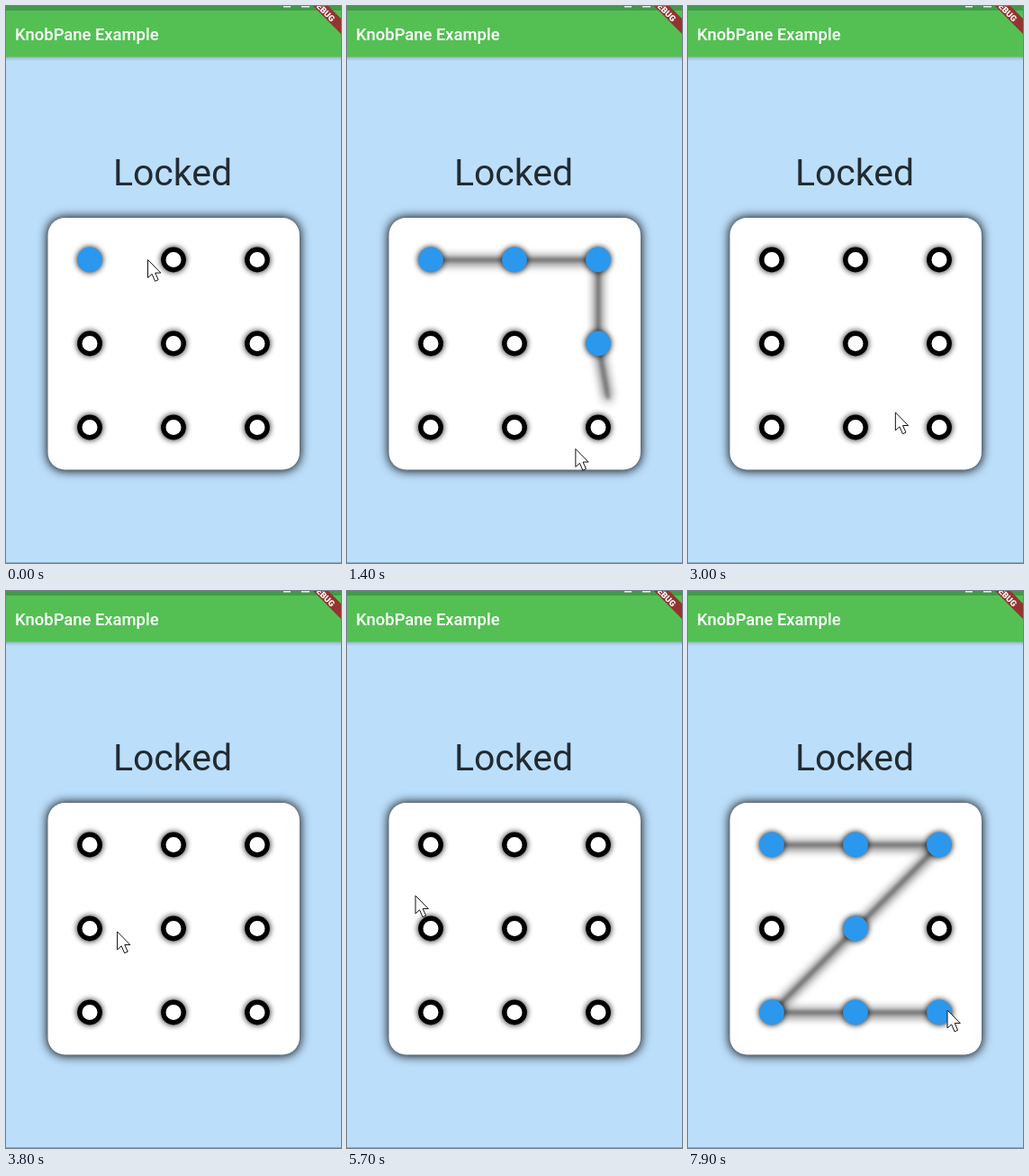
Recreate the animation shown at these times as an HTML page. Size 372 by 618 pixels, loop 8 s.

```html
<!DOCTYPE html>
<html lang="en">
<head>
<meta charset="utf-8">
<title>Pattern lock</title>
<style>
  html, body { margin: 0; width: 100%; height: 100%; overflow: hidden; background: #bbdefb; }
  svg { display: block; width: 372px; height: 618px; }
  text { font-family: Roboto, "Open Sans", sans-serif; }
</style>
</head>
<body>
<svg viewBox="0 0 372 618">
  <defs>
    <filter id="glow" filterUnits="userSpaceOnUse" x="0" y="0" width="372" height="618">
      <feGaussianBlur in="SourceGraphic" stdDeviation="5.5" result="wide"/>
      <feOffset in="wide" dy="1" result="shade"/>
      <feGaussianBlur in="SourceGraphic" stdDeviation="1.8"/>
      <feComponentTransfer result="core"><feFuncA type="linear" slope=".24"/></feComponentTransfer>
      <feMerge><feMergeNode in="shade"/><feMergeNode in="core"/></feMerge>
    </filter>
    <filter id="cardShade" filterUnits="userSpaceOnUse" x="0" y="0" width="372" height="618">
      <feGaussianBlur stdDeviation="6"/>
    </filter>
    <filter id="halo" x="-50%" y="-50%" width="200%" height="200%">
      <feGaussianBlur stdDeviation="3"/>
    </filter>
    <linearGradient id="drop" x2="0" y2="1">
      <stop stop-color="#000" stop-opacity=".2"/>
      <stop offset="1" stop-color="#000" stop-opacity="0"/>
    </linearGradient>
  </defs>

  <rect width="372" height="618" fill="#bbdefb"/>
  <rect y="56" width="372" height="5" fill="url(#drop)"/>
  <rect width="372" height="56.5" fill="#54c054"/>
  <rect width="372" height="5" fill="#43994a"/>
  <path d="M308 0h8v1.5h-8zM328 0h9v1.5h-9z" fill="#e4f3e4"/>
  <text x="10" y="38" font-size="18.4" font-weight="500" fill="#fff">KnobPane Example</text>

  <path d="M341 0L372 31V14L358 0Z" fill="#933430"/>
  <text transform="translate(353 5) rotate(45)" y="3.4" text-anchor="middle"
        font-size="9.4" font-weight="900" fill="#fff">DEBUG</text>

  <text x="185" y="198.6" text-anchor="middle" font-size="41" fill="#222b31">Locked</text>

  <rect x="46" y="234.5" width="280.5" height="281" rx="19" filter="url(#cardShade)"/>
  <rect x="46.5" y="235" width="279.5" height="279.5" rx="19" fill="#fff"/>

  <polyline id="trail" fill="none" stroke="#000" stroke-width="5"
            stroke-linecap="round" stroke-linejoin="round" filter="url(#glow)"/>
  <g id="dots"></g>
  <path d="M0 617.5H372" stroke="#8ea9bf"/>
  <path id="cursor" d="M0 0V20L4.6 15.9L8 23.8L11.6 22.2L8.2 14.6H14.3Z"
        fill="#fff" stroke="#111" stroke-linejoin="round"/>
</svg>

<script>
const LOOP = 8000;
const HIT_RADIUS = 14;

const group = document.getElementById("dots");
const trail = document.getElementById("trail");
const cursor = document.getElementById("cursor");

function addCircle(cx, cy, r, attrs) {
  const circle = document.createElementNS("http://www.w3.org/2000/svg", "circle");
  for (const [key, value] of Object.entries({ cx, cy, r, ...attrs })) circle.setAttribute(key, value);
  return group.appendChild(circle);
}

const dots = Array.from({ length: 9 }, (_, i) => {
  const x = 93 + 93 * (i % 3);
  const y = 281.5 + 93 * Math.floor(i / 3);
  addCircle(x, y, 14.5, { filter: "url(#halo)", opacity: 0.8 });
  return { x, y, face: addCircle(x, y, 11.2, { "stroke-width": 5.4 }) };
});

const at = (x, y) => ({ x, y });
const mix = (a, b, k) => at(a.x + (b.x - a.x) * k, a.y + (b.y - a.y) * k);
const distance = (a, b) => Math.hypot(a.x - b.x, a.y - b.y);
const smooth = k => k * k * (3 - 2 * k);

// Each drag follows its stops at steady speed; the drawn line runs `lag` ms late.
const strokes = [
  { press: -220, lift: 1225, lag: 460, stops: [dots[0], dots[2], at(292, 466), at(283, 516)] },
  { press: 1900, lift: 2500, lag: 300, stops: [at(110, 370), dots[3], dots[5], at(283, 487)] },
  { press: 3800, lift: 5000, lag: 450, stops: [at(124, 378), dots[3], dots[5], at(205, 427), at(33, 481)] },
  { press: 6080, lift: 7460, lag: 240, stops: [dots[0], dots[2], at(208, 357), dots[6], at(288, 465)] }
];

function along(stops, k) {
  const lengths = stops.slice(1).map((stop, i) => distance(stops[i], stop));
  let left = k * lengths.reduce((sum, length) => sum + length, 0);
  let i = 0;
  while (i < lengths.length - 1 && left > lengths[i]) left -= lengths[i++];
  return mix(stops[i], stops[i + 1], left / lengths[i]);
}

function strokePoint({ press, lift, stops }, t) {
  const k = (t - press) / (lift - press);
  return along(stops, Math.min(1, Math.max(0, k)));
}

function pointerAt(t) {
  const i = strokes.findLastIndex(stroke => t >= stroke.press);
  const stroke = strokes[i];
  const next = strokes[i + 1];
  const point = strokePoint(stroke, t);
  if (!next || t < stroke.lift) return point;
  return mix(point, next.stops[0], smooth((t - stroke.lift) / (next.press - stroke.lift)));
}

function dotsTouched(stroke, end) {
  const touched = new Set();
  for (let t = stroke.press; t <= end; t += 10) {
    const point = strokePoint(stroke, t);
    const dot = dots.find(d => distance(d, point) < HIT_RADIUS);
    if (dot) touched.add(dot);
  }
  return touched;
}

function render(t) {
  const stroke = strokes.find(s => t >= s.press && t < s.lift + s.lag) ||
    (t >= strokes.at(-1).press ? strokes.at(-1) : null);
  let selected = new Set();
  let points = [];
  if (stroke) {
    const tipTime = Math.max(stroke.press, t - stroke.lag);
    selected = dotsTouched(stroke, tipTime);
    if (selected.size) points = [...selected, strokePoint(stroke, tipTime)];
  }
  trail.setAttribute("points", points.map(p => `${p.x},${p.y}`).join(" "));

  for (const dot of dots) {
    const on = selected.has(dot);
    dot.face.setAttribute("fill", on ? "#2b98ee" : "#fff");
    dot.face.setAttribute("stroke", on ? "#2b98ee" : "#000");
  }

  const { x, y } = pointerAt(t);
  cursor.setAttribute("transform", `translate(${x} ${y})`);
}

const start = performance.now();
function tick() {
  render((performance.now() - start) % LOOP);
  requestAnimationFrame(tick);
}
tick();
</script>
</body>
</html>
```
